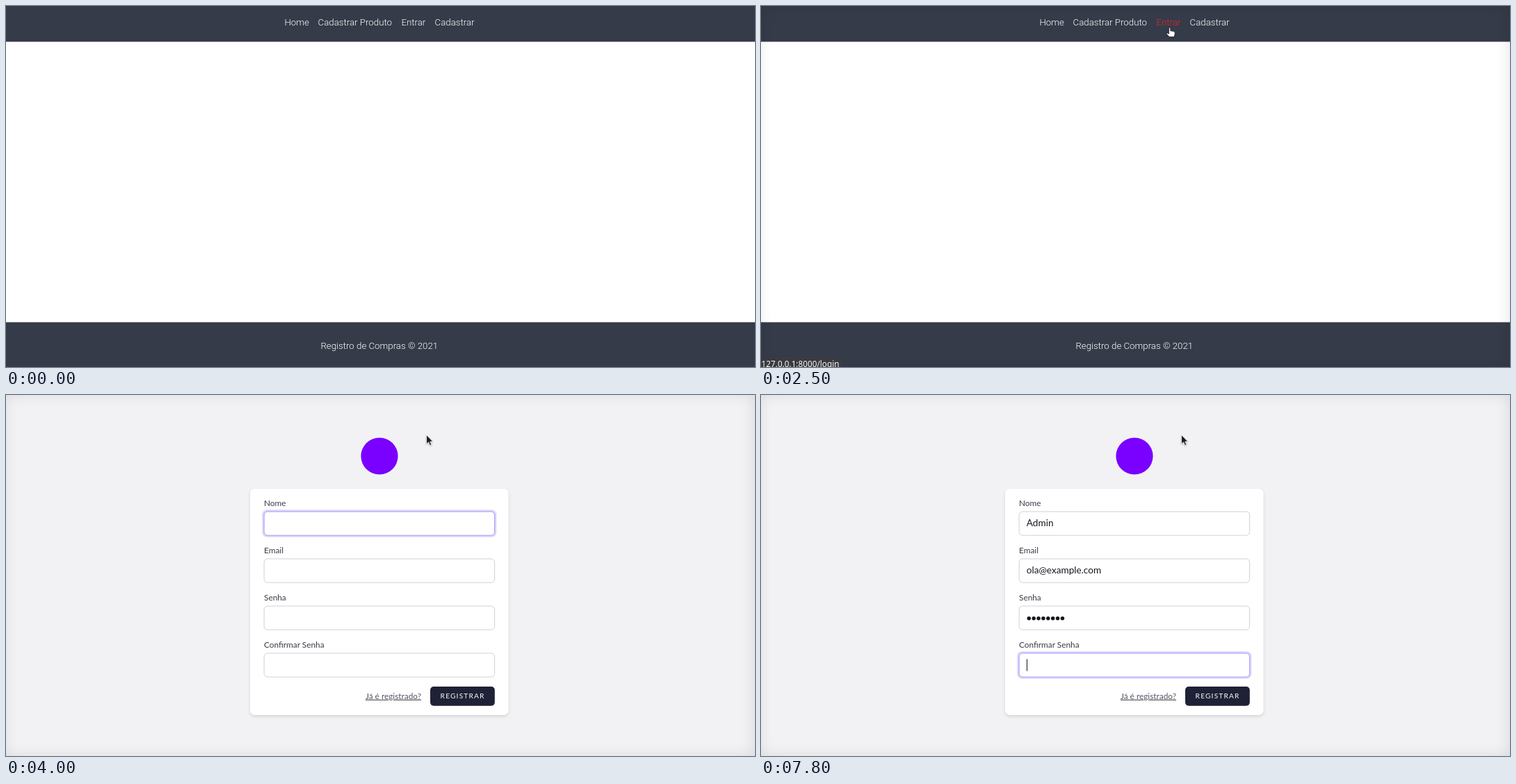
Write an HTML page that moves like this. It is 1077 px wide and 520 px high and loops after 8 s.

```html
<!DOCTYPE html>
<html lang="pt">
<head>
<meta charset="utf-8">
<title>Registro de Compras</title>
<style>
html, body { margin: 0; width: 1077px; height: 520px; overflow: hidden; background: #fff; }
svg { display: block; position: absolute; left: 0; top: 0; }
#edge { position: absolute; inset: 0; box-shadow: inset -2px 0 20px rgba(0, 0, 0, .1); }
text { white-space: pre; }
.nav { font: 300 13.28px Roboto, sans-serif; fill: #fff; }
.hot { fill: #e3282c; }
.form text { font-family: Lato, sans-serif; }
.label { font-size: 11.85px; fill: #3c3948; }
.value { font-size: 13.6px; fill: #1a1420; }
.link { font-size: 11.85px; fill: #55525f; text-decoration: underline; }
.action { font-size: 10.1px; letter-spacing: .12em; fill: #fff; }
.plain text { font-family: "Noto Sans", sans-serif; }
.plain .label { font-size: 10.8px; font-weight: 600; }
.plain .link { font-size: 11.4px; }
.plain .action { font-size: 9.3px; font-weight: 700; fill: #26242c; }
.status { font: 11.75px "Noto Sans", sans-serif; fill: #f4f4f4; }
</style>
</head>
<body>
<svg id="stage" width="1077" height="520"></svg>
<div id="edge"></div>
<svg id="top" width="1077" height="520"></svg>
<script>
const LOOP = 8000, STEP = 100;
const EMAIL = 'ola@example.com';
const NS = 'http://www.w3.org/2000/svg';
const stage = document.getElementById('stage');
const top2 = document.getElementById('top');
const edge = document.getElementById('edge');

function add(parent, tag, attrs = {}, text) {
  const el = document.createElementNS(NS, tag);
  for (const k in attrs) el.setAttribute(k, attrs[k]);
  if (text) el.textContent = text;
  parent.appendChild(el);
  return el;
}
const set = (el, attrs) => { for (const k in attrs) el.setAttribute(k, attrs[k]); };
const show = (el, on) => el.setAttribute('visibility', on ? 'visible' : 'hidden');
const box = (p, x, y, width, height, fill, rx = 0) => add(p, 'rect', { x, y, width, height, fill, rx });
const label = (p, x, y, cls, text) => add(p, 'text', { x, y, class: cls }, text);
const clamp = v => Math.max(0, Math.min(1, v));

// Home page
const home = add(stage, 'g');
box(home, 0, 0, 1077, 520, '#fff');
box(home, 0, 0, 1077, 51.5, '#363b49');
box(home, 0, 455.5, 1077, 64.5, '#363b49');
const links = [
  { text: 'Home', x: 400.4, from: 394, url: '' },
  { text: 'Cadastrar Produto', x: 448.6, from: 442, url: '/produtos/create' },
  { text: 'Entrar', x: 568.4, from: 562, url: '/login' },
  { text: 'Cadastrar', x: 616.6, from: 610, url: '/register' }
];
for (const l of links) l.el = label(home, l.x, 28.3, 'nav', l.text);
label(home, 536.8, 494.3, 'nav', 'Registro de Compras © 2021').setAttribute('text-anchor', 'middle');

// Sign-up page
const form = add(stage, 'g', { class: 'form' });
box(form, 0, 0, 1077, 520, '#f2f2f4');
add(form, 'circle', { cx: 537, cy: 88, r: 26.6, fill: '#7a00ff' });
const card = box(form, 351, 135, 371.5, 326, '#fff', 6.6);
card.style.filter = 'drop-shadow(0 2px 2.2px rgba(0,0,0,.12))';
const fields = ['Nome', 'Email', 'Senha', 'Confirmar Senha'].map((name, i) => {
  const y = 168 + 68 * i;
  label(form, 371, y - 8.2, 'label', name);
  const ring = box(form, 368.3, y - 2.7, 337, 39.4, '#dcd7fb', 7);
  const rect = box(form, 371.1, y, 331.5, 34.2, '#fff', 5);
  return { y, ring, rect, value: label(form, 381.8, y + 21.4, 'value', '') };
});
const dots = Array.from({ length: 8 }, (_, i) =>
  add(form, 'circle', { cx: 385.3 + 6.88 * i, cy: 321.7, r: 2.75, fill: '#1a1420' }));
const caret = box(form, 382, 176.5, 1, 17, '#15121a');
const login = label(form, 597, 437.7, 'link', 'Já é registrado?');
login.setAttribute('text-anchor', 'end');
const button = box(form, 610, 420, 92.8, 27.8, '#1f2236', 5);
label(form, 624.6, 437.2, 'action', 'REGISTRAR');

// Status bar and pointer
const status = add(top2, 'g');
const statusBox = box(status, -6, 507, 90, 20, '#3c3c3c', 4);
statusBox.setAttribute('fill-opacity', .77);
const statusText = label(status, .6, 520.2, 'status', '');
const pointer = add(top2, 'g');
pointer.style.filter = 'drop-shadow(0 1px 1px rgba(0,0,0,.25))';
const arrow = add(pointer, 'path', {
  d: 'M0 0V13L3 10.3L5.1 15L7.3 14L5.2 9.5H9.2Z',
  fill: '#1c1c1c', stroke: '#fff', 'stroke-width': .8
});
const hand = add(pointer, 'path', {
  d: 'M-1.6 1Q-.4 -.6 .8 1V5Q2 4.2 3 5.2Q4.4 4.6 5.2 5.8Q6.8 5.4 7.2 7V9.5L6 13.4H-1L-4.8 9.3Q-4.8 7.5 -3 8L-1.6 9.2Z',
  fill: '#fff', stroke: '#2b2b2b', 'stroke-width': .9
});

const path = [
  [800, 898, 141], [1200, 640, 128], [1500, 435, 62], [1600, 425, 33], [1800, 422.4, 28],
  [2000, 438, 28], [2200, 505, 27], [2400, 570, 28], [2500, 588, 31], [2600, 611, 38],
  [2900, 612, 49], [3300, 611, 50.5], [3400, 608, 52], [3800, 604.6, 57.6]
];
function along(t) {
  const i = path.findIndex(p => p[0] > t);
  if (i < 0) return path[path.length - 1].slice(1);
  if (i === 0) return path[0].slice(1);
  const [a, b] = [path[i - 1], path[i]];
  const k = (t - a[0]) / (b[0] - a[0]);
  return [a[1] + (b[1] - a[1]) * k, a[2] + (b[2] - a[2]) * k];
}

const keysName = [4200, 4700, 5000, 5100, 5300];
const keysPass = [6400, 6600, 6700, 6900, 7200, 7400, 7500, 7600];
const focusAt = [3400, 5400, 6100, 7800];
const count = (times, t) => times.filter(k => k <= t).length;

function drawForm(t) {
  form.setAttribute('class', t < 3500 ? 'form plain' : 'form');
  const focus = count(focusAt, t) - 1;
  fields[0].value.textContent = 'Admin'.slice(0, count(keysName, t));
  fields[1].value.textContent = t >= 5800 ? EMAIL : '';
  fields.forEach((f, i) => {
    f.ring.setAttribute('visibility', i === focus ? 'inherit' : 'hidden');
    f.rect.setAttribute('stroke', i === focus ? '#a596f5' : '#d1d1d7');
  });
  const typed = count(keysPass, t);
  dots.forEach((d, i) => d.setAttribute('visibility', i < typed ? 'inherit' : 'hidden'));
  const field = fields[focus];
  const width = focus === 2 ? typed * 6.88 : field.value.getComputedTextLength();
  set(caret, {
    x: Math.round(381.8 + width), y: field.y + 8.5,
    visibility: t >= 4000 && t < 4200 ? 'hidden' : 'inherit'
  });
  set(button, t < 3500
    ? { x: 611, width: 91.5, fill: '#c9c9cb', stroke: '#89898d' }
    : { x: 610, width: 92.8, fill: '#1f2236', stroke: 'none' });
}

function draw(now) {
  const t = Math.floor(now % LOOP / STEP) * STEP;
  const onForm = t >= 3400;
  const [x, y] = along(t);
  const hot = t >= 1600 && !onForm ? links.filter(l => l.from <= x).pop() : null;

  show(home, !onForm);
  show(form, onForm);
  for (const l of links) l.el.classList.toggle('hot', l === hot);
  if (onForm) drawForm(t);

  edge.style.opacity = clamp((t - 700) / 400);
  show(pointer, t >= 800);
  pointer.setAttribute('transform', `translate(${x} ${y})`);
  arrow.setAttribute('display', hot ? 'none' : 'inline');
  hand.setAttribute('display', hot ? 'inline' : 'none');

  const url = hot ? hot.url : '/register';
  statusText.textContent = '127.0.0.1:8000' + url;
  statusBox.setAttribute('width', statusText.getComputedTextLength() + 11.5);
  status.setAttribute('opacity', Math.min(clamp((t - 1600) / 400), clamp((3800 - t) / 400)));
}

const start = performance.now();
function tick() {
  draw(performance.now() - start);
  requestAnimationFrame(tick);
}
tick();
</script>
</body>
</html>
```
